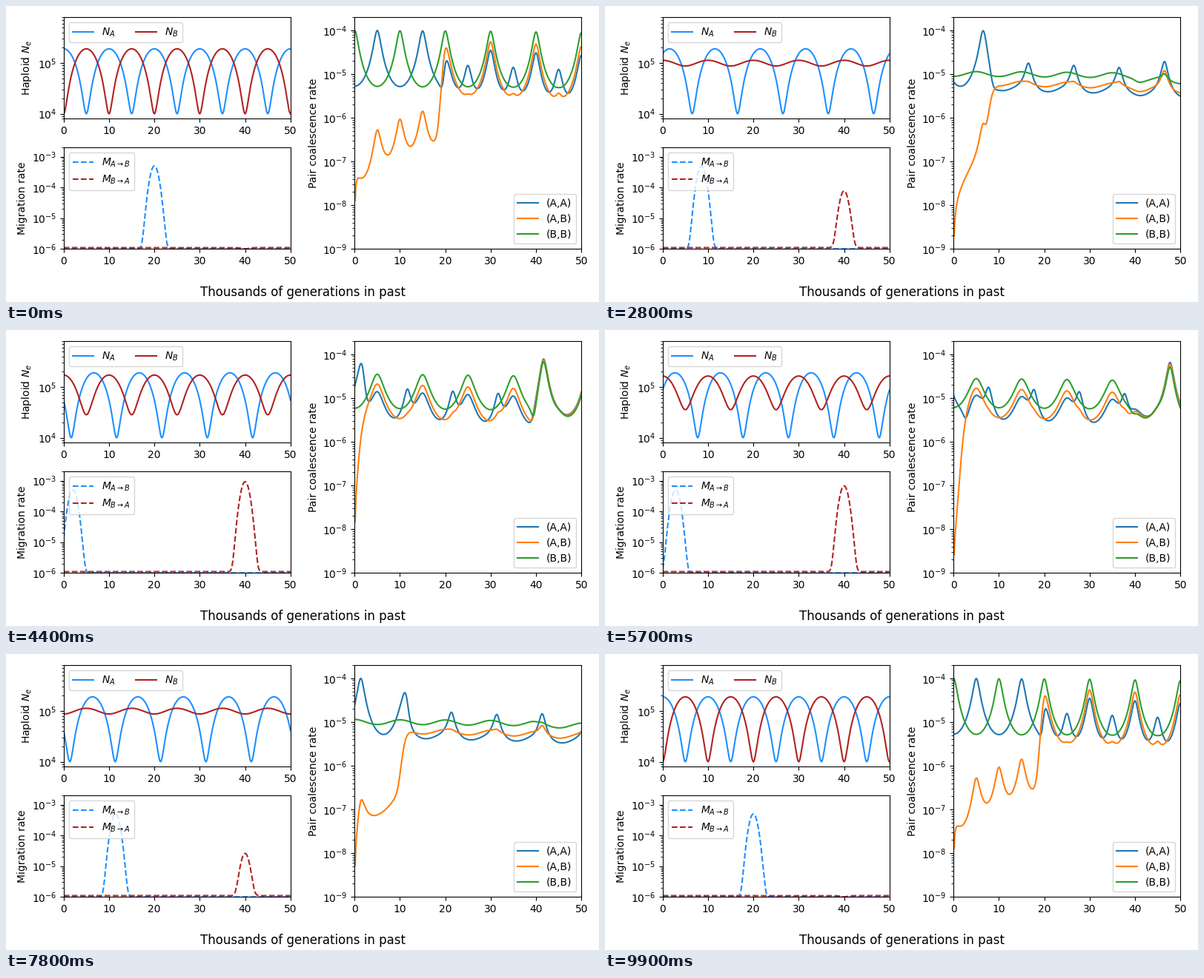
Recreate the animation shown at these times as a matplotlib script. Size 800x400 px, loop 10000 ms.

```python
import numpy as np
import matplotlib.pyplot as plt
from matplotlib.animation import FuncAnimation

FRAMES = 100
STEPS = 400
SUB = 2              # integration steps per plotted point
WIDTH = 0.75         # spread of a migration pulse, in thousands of generations
BASE_AB, BASE_BA = 1e-6, 1.1e-6

time = np.linspace(0, 50, STEPS + 1)

# One entry per frame: steady drift of A's phase, back-and-forth sweep of the rest
idx = np.arange(FRAMES)
shift = 30 * idx / (FRAMES - 1)
sweep = np.minimum(idx, FRAMES - 1 - idx) / (FRAMES // 2 - 1)
swing = -0.9 + 1.8 * sweep
pulse_time = 20 * (1 - sweep)
pulse_height = 1e-6 * 2000 ** sweep


def size_a(t, k=slice(None)):
    return 1e5 * (1 + 0.9 * np.cos(2 * np.pi * (t + shift[k]) / 10))


def size_b(t, k=slice(None)):
    return 1e5 * (1 + swing[k] * np.cos(2 * np.pi * t / 10))


def pulse(t, centre, height, base):
    w = np.exp(-0.5 * ((t - centre) / WIDTH) ** 2)
    return base + (height - base) * w


def mig_ab(t, k=slice(None)):
    return pulse(t, pulse_time[k], 5e-4, BASE_AB)


def mig_ba(t, k=slice(None)):
    return pulse(t, 40, pulse_height[k], BASE_BA)


def flow(t, p):
    """Change per thousand generations of the pair states AA, AB, BB."""
    aa, ab, bb = p
    m, n = mig_ab(t), mig_ba(t)
    return 1000 * np.stack([
        n * ab - (2 * m + 1 / size_a(t)) * aa,
        2 * m * aa + 2 * n * bb - (m + n) * ab,
        m * ab - (2 * n + 1 / size_b(t)) * bb,
    ])


def coalescence_rates():
    """Rates indexed by [time, starting pair, frame]."""
    p = np.repeat(np.eye(3)[:, :, None], FRAMES, axis=2)
    h = time[1] / SUB
    out = np.empty((STEPS + 1, 3, FRAMES))
    for i, t0 in enumerate(time):
        out[i] = (p[0] / size_a(t0) + p[2] / size_b(t0)) / p.sum(axis=0)
        for j in range(SUB):
            t = t0 + j * h
            k1 = flow(t, p)
            k2 = flow(t + h / 2, p + h / 2 * k1)
            k3 = flow(t + h / 2, p + h / 2 * k2)
            k4 = flow(t + h, p + h * k3)
            p = p + h / 6 * (k1 + 2 * k2 + 2 * k3 + k4)
    out[out <= 0] = np.nan
    return out


rates = coalescence_rates()

fig, axes = plt.subplot_mosaic([["size", "rate"], ["mig", "rate"]],
                               figsize=(8, 4), dpi=100)


def setup(name, ylabel, ylim, curves, style="-", **legend):
    ax = axes[name]
    lines = [ax.plot([], [], style, color=c, label=s)[0] for s, c in curves]
    ax.set_yscale("log")
    ax.set_xlim(0, 50)
    ax.set_ylim(*ylim)
    ax.set_ylabel(ylabel)
    ax.legend(**legend)
    return lines


lines = setup("size", "Haploid $N_e$", (8e3, 8e5),
              [("$N_A$", "dodgerblue"), ("$N_B$", "firebrick")],
              loc="upper left", ncol=2)
lines += setup("mig", "Migration rate", (1e-6, 2e-3),
               [(r"$M_{A \rightarrow B}$", "dodgerblue"),
                (r"$M_{B \rightarrow A}$", "firebrick")],
               style="--", loc="upper left")
lines += setup("rate", "Pair coalescence rate", (1e-9, 2e-4),
               [("(A,A)", "C0"), ("(A,B)", "C1"), ("(B,B)", "C2")],
               loc="lower right")

fig.supxlabel("Thousands of generations in past")
fig.tight_layout()


def draw(k):
    curves = [f(time, k) for f in (size_a, size_b, mig_ab, mig_ba)]
    curves += list(rates[:, :, k].T)
    for line, y in zip(lines, curves):
        line.set_data(time, y)
    return lines


anim = FuncAnimation(fig, draw, frames=FRAMES, interval=100,
                     repeat=True, repeat_delay=0)
plt.show()
```
